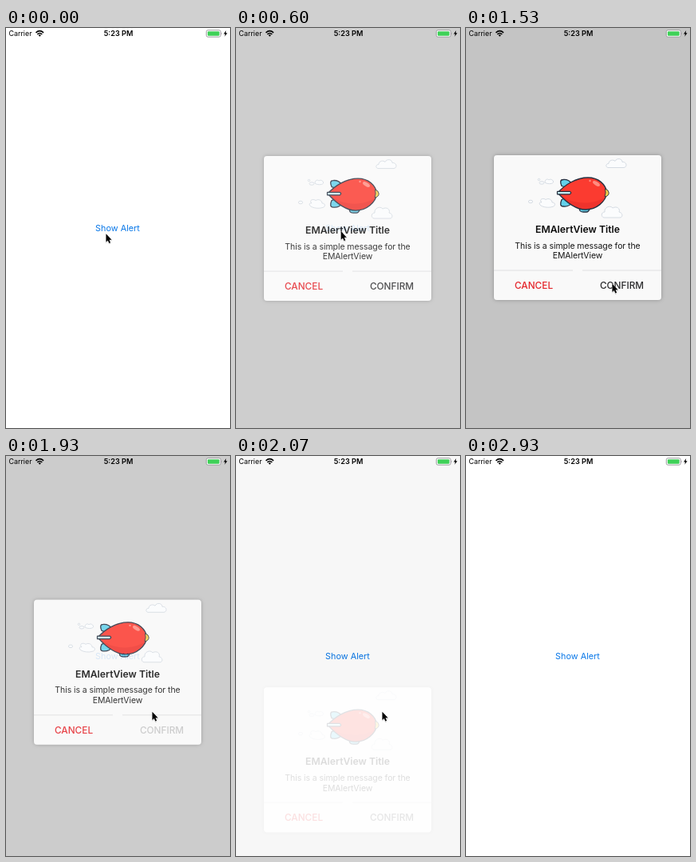
An HTML page that plays this animation: 281 by 500 pixels, repeating every 2.99 s.

```html
<!DOCTYPE html>
<html lang="en">
<head>
<meta charset="utf-8">
<title>Alert demo</title>
<style>
  html, body { margin: 0; width: 100%; height: 100%; overflow: hidden; background: #fff; }
  svg { display: block; width: 100vw; height: 100vh; }
  text { font-family: Inter, Roboto, sans-serif; }
  .mid { text-anchor: middle; }
  .body { font-size: 10.5px; letter-spacing: -.07px; }
  .action { font-size: 11.8px; font-weight: 500; }
  .cloud { fill: #fbfcfd; stroke: #ccd3dc; stroke-width: .8; stroke-linejoin: round; }
  .ink { stroke: #263040; stroke-width: 1.3; stroke-linejoin: round; }
</style>
</head>
<body>
<svg viewBox="0 0 281 500">
  <defs>
    <filter id="soft" x="-10%" y="-10%" width="120%" height="120%">
      <feDropShadow dx="0" dy="0" stdDeviation="2.5" flood-opacity=".28"/>
    </filter>
    <filter id="drop" x="-50%" y="-50%" width="200%" height="200%">
      <feDropShadow dx="0" dy=".8" stdDeviation=".7" flood-opacity=".3"/>
    </filter>
    <path id="hull" d="M115 206C124 196 138 187 153 187C166 187 175 195 177 206C175 217 164 227 150 227C137 227 124 216 115 206Z"/>
    <clipPath id="inside"><use href="#hull"/></clipPath>
  </defs>

  <rect width="281" height="500" fill="#fff"/>
  <text id="show" class="mid" x="140" y="253.800" font-size="10.85" fill="#0a78e8">Show Alert</text>

  <g id="modal">
    <rect width="281" height="500" fill-opacity=".231"/>
    <g id="card">
      <rect x="35" y="159" width="210" height="181" rx="4" fill="#f9f9f9" filter="url(#soft)"/>
      <path d="M35 303H134M146 303H245" stroke="#dcdcde" stroke-width=".9"/>

      <g class="cloud">
        <path d="M178 174.500C175 174 175 169.500 179 169.500C179 165 185 164 187 166.500C189 162 196 163 196 167.500C202 167 202.500 174 198 174.500Z"/>
        <path d="M173 237C169 236 169.500 230 174 230C173 224 181 221 184 225C189 222 194 226 192 230C197 231 197 237 193 237Z"/>
        <path d="M94 222C91 220 92 217 95 218C91 214 97 212 100 214.500C104 212 108 215 108 218C113 218 112 223.500 108 223.500C104 225 97 224 94 222Z"/>
        <path d="M99 193C99 189.500 102 188 104 190C106 188 110 190 109.500 193C108 195.500 101 195 99 193Z"/>
        <ellipse cx="95" cy="193.500" rx="3" ry="1.700"/>
        <circle cx="91.500" cy="189.500" r="1.200"/>
        <ellipse cx="81" cy="217" rx="2.600" ry="1.800"/>
      </g>

      <g class="ink">
        <path d="M142 225L143 228.500Q144 230 147 230H151Q154 230 155 226Z" fill="#63d0ea"/>
        <path d="M128 200L120 197.500Q116.500 189.500 122 189.500Q129 189 133 195Z" fill="#63d0ea"/>
        <path d="M126 212L120 214.500Q116.500 223 122 223Q129 224 133 218Z" fill="#63d0ea"/>
        <use href="#hull" fill="#fb3b30" stroke="none"/>
        <g clip-path="url(#inside)" stroke="none">
          <path d="M115 206C130 220 160 225 180 207V235H115Z" fill="#dc2827" opacity=".4"/>
          <ellipse cx="163.500" cy="194.500" rx="5" ry="2.300" transform="rotate(32 163.500 194.500)" fill="#ff8b80"/>
          <circle cx="155.500" cy="191" r="1.200" fill="#ff8b80"/>
        </g>
        <use href="#hull" fill="none"/>
        <path d="M174.500 201Q179.200 202.500 179.200 206Q179.200 210 174 211Q176 206 174.500 201Z" fill="#f5d04a" stroke-width=".9"/>
        <path d="M114.500 204.300H130Q133.500 206 130 207.800H114.500Z" fill="#c9f1f8" stroke-width="1.200"/>
      </g>

      <text class="mid" x="140" y="256" font-size="12.25" font-weight="600" fill="#0c0c0c">EMAlertView Title</text>
      <text class="mid body" x="140" y="275.500" fill="#161616">This is a simple message for the</text>
      <text class="mid body" x="140" y="288.400" fill="#161616">EMAlertView</text>
      <text class="mid action" x="85" y="325.700" fill="#e4262c">CANCEL</text>
      <text id="confirm" class="mid action" x="195.500" y="325.700" fill="#2c2c2e">CONFIRM</text>
    </g>
  </g>

  <g>
    <text x="3.500" y="10" font-size="8.900">Carrier</text>
    <g fill="none" stroke="#000" stroke-width="1.500">
      <path d="M37.500 5.900Q42.300 1.400 47.100 5.900M39.300 7.900Q42.300 5.200 45.300 7.900"/>
      <path d="M40.600 8.900Q42.300 7.400 44 8.900L42.300 10.700Z" fill="#000" stroke="none"/>
    </g>
    <text class="mid" x="141" y="10" font-size="9.15" font-weight="600">5:23 PM</text>
    <rect x="251.300" y="2.700" width="18" height="8.500" rx="2" fill="#fff" stroke="#929296" stroke-width=".9"/>
    <rect x="252.900" y="4.200" width="14.800" height="5.500" rx="1" fill="#3fd158"/>
    <path d="M270.200 5.400Q271.600 6.800 270.200 8.200Z" fill="#98989c"/>
    <path d="M276.200 3L273 7.400H275L274.300 10.800L277.600 6.200H275.600Z"/>
  </g>

  <path id="cursor" d="M0 .8V11L2.300 8.900L3.900 12.500L5.600 11.800L4 8.200H7.100Z" stroke="#fff" stroke-width=".7" paint-order="stroke" filter="url(#drop)"/>
</svg>
<script>
  const LOOP = 2990, STEP = 200 / 3, FADE = 250;
  const OPEN = 415, CLOSE = 1875, RECOVER = 20;
  const PRESS_SHOW = 330, PRESS_CONFIRM = 1730, CURSOR_GONE = 2900;
  const track = [
    [0, 125.5, 256.5], [133, 131.7, 253.5], [600, 131.7, 253.5], [867, 150, 274],
    [1467, 183.5, 319], [2067, 183.5, 319], [2400, 179, 301], [2533, 170, 290], [2867, 118, 262]
  ];
  const [show, modal, card, confirmBtn, cursor] =
    ['show', 'modal', 'card', 'confirm', 'cursor'].map(id => document.getElementById(id));

  const ramp = (t, start) => Math.min(1, Math.max(0, (t - start) / FADE));
  const ease = p => p * p * (3 - 2 * p);
  const move = (el, x, y) => el.setAttribute('transform', `translate(${x} ${y})`);

  // A pressed label dims at once, then recovers during the transition.
  const pressed = (t, down, up) => t < down ? 1 : .2 + .8 * ease(ramp(t, up + RECOVER));

  function cursorAt(t) {
    const i = track.findIndex(k => k[0] > t);
    if (i < 0) return track[track.length - 1].slice(1);
    const [t0, x0, y0] = track[i - 1], [t1, x1, y1] = track[i];
    const p = (t - t0) / (t1 - t0);
    return [x0 + (x1 - x0) * p, y0 + (y1 - y0) * p];
  }

  function draw(time) {
    const t = Math.floor((time + 4) / STEP) * STEP;
    const opening = ramp(t, OPEN), closing = ease(ramp(t, CLOSE));
    modal.setAttribute('opacity', ease(opening) - closing);
    move(card, 0, 60 * (1 - opening) ** 3 + 151 * closing);
    show.setAttribute('opacity', pressed(t, PRESS_SHOW, OPEN));
    confirmBtn.setAttribute('opacity', pressed(t, PRESS_CONFIRM, CLOSE));
    move(cursor, ...cursorAt(t));
    cursor.setAttribute('visibility', t < CURSOR_GONE ? 'visible' : 'hidden');
  }

  const start = performance.now();
  function tick() {
    draw((performance.now() - start) % LOOP);
    requestAnimationFrame(tick);
  }
  tick();
</script>
</body>
</html>
```
